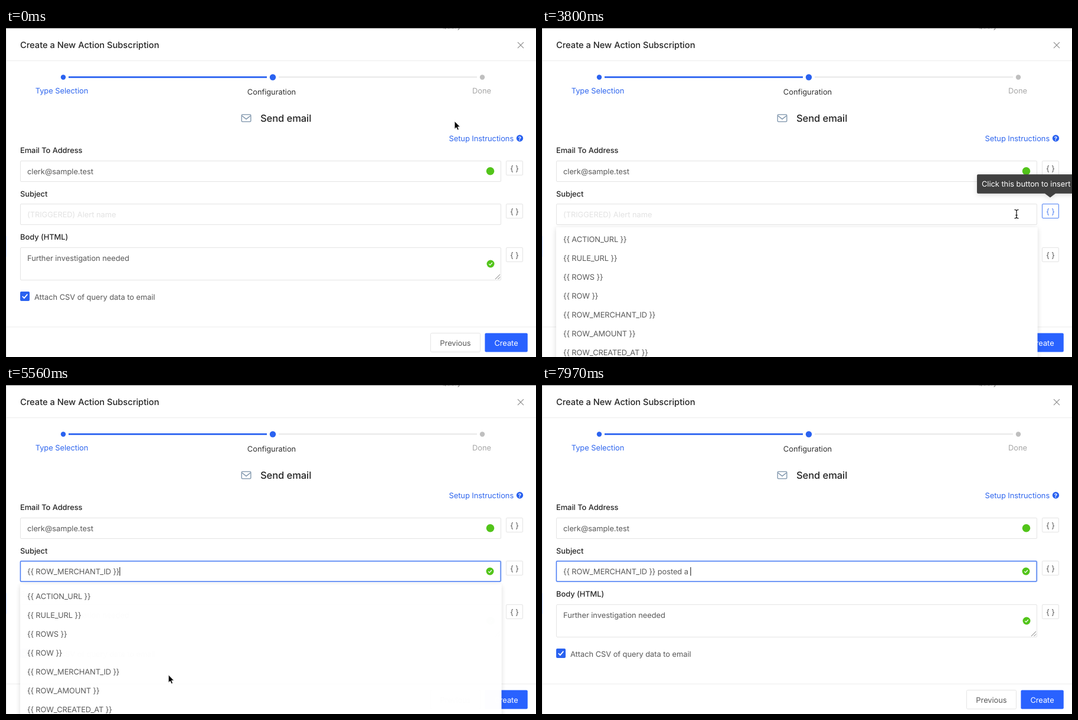
An HTML page that plays this animation: 898 by 558 pixels, repeating every 8000 ms.

```html
<!DOCTYPE html>
<html lang="en">
<head>
<meta charset="utf-8">
<title>Action subscription</title>
<style>
  html, body { margin: 0; width: 100%; height: 100%; overflow: hidden; background: #fff; }
  svg { display: block; width: 100%; height: 100%; }
  text {
    font: 400 12.9px Inter, "Open Sans", sans-serif;
    letter-spacing: -.05px; fill: #595959; white-space: pre;
    text-rendering: geometricPrecision;
  }
  .label { font-weight: 500; fill: #262626; }
  .title { font-size: 14.7px; letter-spacing: -.03px; }
  .head { font-size: 16.6px; letter-spacing: -.12px; }
  .code { letter-spacing: -.1px; }
  .blue { fill: #2f66ee; }
  .mid { text-anchor: middle; }
  .box { fill: #fff; stroke: #e4e4e4; }
</style>
</head>
<body>
<svg id="stage" viewBox="0 0 898 558" xmlns="http://www.w3.org/2000/svg">
  <defs>
    <filter id="shadow" x="-10%" y="-30%" width="120%" height="160%">
      <feDropShadow dx="0" dy="2" stdDeviation="4" flood-opacity=".15"/>
    </filter>
    <g id="ok">
      <circle r="6.5" fill="#52c41a"/>
      <path d="M-2.8 .1 -.8 2.1 2.9 -2" fill="none" stroke="#fff" stroke-width="1.3"/>
    </g>
  </defs>

  <rect width="898" height="558" fill="#fff"/>
  <path d="M0 .5H898" stroke="#8c8c8c"/>
  <path d="M.5 1V558" stroke="#e6e6e6"/>
  <path d="M.5 353V388" stroke="#c9d8fb"/>
  <text x="738" y="1.2" style="font-size:11.5px;fill:#666">Query</text>

  <text class="label title" x="24" y="33.5">Create a New Action Subscription</text>
  <path d="M867 24.2 877 34.2M877 24.2 867 34.2" stroke="#8c8c8c" stroke-width="1.2"/>
  <path d="M1 55.5H898M1 507H898" stroke="#ececec"/>

  <path d="M106 83.3H442" stroke="#2a62f0" stroke-width="2.8"/>
  <path d="M462 83.3H798" stroke="#ebebeb" stroke-width="2.6"/>
  <circle cx="97" cy="83.5" r="4.2" fill="#2a62f0"/>
  <circle cx="452" cy="83.5" r="5.2" fill="#2a62f0"/>
  <circle cx="807" cy="83.5" r="4.2" fill="#bfbfbf"/>
  <text class="mid blue" x="94.5" y="111">Type Selection</text>
  <text class="mid" x="450" y="113" style="fill:#333">Configuration</text>
  <text class="mid" x="806" y="111" style="fill:#a6a6a6">Done</text>

  <g fill="none" stroke="#7890a8" stroke-width="1.3">
    <rect x="399.2" y="146.8" width="15.6" height="12" rx="1.4"/>
    <path d="M400 149 407 154.6 414 149"/>
  </g>
  <text class="label head" x="431" y="158.5">Send email</text>

  <text class="blue" x="750.5" y="191.5">Setup Instructions</text>
  <circle cx="870.5" cy="187" r="5.7" fill="#2a62f0"/>
  <text class="mid" x="870.5" y="190.5" style="font-size:9.5px;font-weight:700;fill:#fff">?</text>

  <text class="label" x="24" y="212">Email To Address</text>
  <rect class="box" x="24.5" y="225.5" width="814" height="35" rx="1.5"/>
  <text x="36" y="247.5">clerk@sample.test</text>
  <circle cx="820.5" cy="242.8" r="6.8" fill="#52c41a"/>

  <text class="label" x="24" y="285.5">Subject</text>
  <rect id="glow" x="23" y="297.5" width="817" height="37" rx="3" fill="#d5e2ff"/>
  <rect class="box" x="24.5" y="298.5" width="814" height="35" rx="1.5"/>
  <rect id="focus" x="24.5" y="298.8" width="813.5" height="34.4" rx="1.5" fill="none" stroke="#4a7df3" stroke-width="1.4"/>
  <text id="hint" x="36" y="321" style="fill:#e2e2e2">(TRIGGERED) Alert name</text>
  <text id="subject" class="code" x="36" y="321"></text>
  <rect id="caret" y="309" width="1.1" height="14.5" fill="#222"/>
  <use id="valid" href="#ok" x="820" y="316"/>

  <text class="label" x="24" y="358.5">Body (HTML)</text>
  <rect class="box" x="24.5" y="372.5" width="814" height="55" rx="1.5"/>
  <text x="36" y="394.5">Further investigation needed</text>
  <use href="#ok" x="821" y="400"/>
  <path d="M829 426 837 418M833.5 426 837 422.5" stroke="#777"/>

  <rect x="24" y="447" width="16" height="16" rx="2" fill="#2a62f0"/>
  <path d="M27.8 455 30.8 458.2 36.3 451.6" fill="none" stroke="#fff" stroke-width="1.8"/>
  <text x="48" y="460.5">Attach CSV of query data to email</text>

  <rect class="box" x="719.5" y="517.5" width="84" height="32" rx="2"/>
  <text class="mid" x="761.5" y="538.5">Previous</text>
  <rect x="811.4" y="517.4" width="72.4" height="32.2" rx="2" fill="#2962ff"/>
  <text class="mid" x="847.5" y="538.5" style="fill:#fff">Create</text>

  <g id="braces"></g>

  <g id="menu">
    <rect x="24" y="338" width="815.5" height="250" rx="2" fill="#fff" filter="url(#shadow)"/>
    <rect id="hover" x="24" width="815.5" height="32" fill="#e4f6ff"/>
  </g>

  <g id="tip">
    <path d="M739 248.3H920V280.8H870L861 287.6 852 280.8H739Q737 280.8 737 278.8V250.3Q737 248.3 739 248.3Z" fill="#404040" filter="url(#shadow)"/>
    <text x="745" y="269.2" style="fill:#fff">Click this button to insert</text>
  </g>

  <g id="cursor">
    <path id="arrow" d="M0 0V13.4L3 10.7 5.1 15.2 7.4 14.2 5.4 9.8H9.5Z" fill="#000" stroke="#fff" stroke-width=".9"/>
    <path id="beam" d="M-3.5 -7.3Q0 -7.3 0 -5V5Q0 7.3 -3.5 7.3M3.5 -7.3Q0 -7.3 0 -5V5Q0 7.3 3.5 7.3M-1.6 2H1.6" fill="none" stroke="#222" stroke-width="1.3"/>
    <g id="hand" stroke="#111" stroke-width="1.1" stroke-linejoin="round" stroke-linecap="round">
      <path d="M-1.4 9.2V1.6Q-1.4 .3 -.1 .3 1.2 .3 1.2 1.6V5.6Q3.4 4.6 4 6 6.2 5.2 6.7 6.8 9.6 6.2 9.6 8.6 9.6 12.2 7.8 14V16H.6V14.4Q-1.4 12.6 -4 8.8 -4.6 7.4 -3.4 7.2 -2.4 7.2 -1.4 9.2Z" fill="#fff"/>
      <path d="M1.2 5.6V8.2M4 6V8.4M6.7 6.8V8.6M2.2 11V13.6M4.2 11V13.6M6.2 11V13.6" fill="none" stroke-width=".9"/>
    </g>
  </g>
</svg>

<script>
const LOOP = 8000;
const MENU_TOP = 338, ROW_TOP = 342, ROW_H = 32;
const PICK = 5410;
const CHOICE = '{{ ROW_MERCHANT_ID }}';
const ITEMS = ['ACTION_URL', 'RULE_URL', 'ROWS', 'ROW', 'ROW_MERCHANT_ID', 'ROW_AMOUNT', 'ROW_CREATED_AT'];
const TYPED = ' posted a ';
const KEYS = [6450, 7020, 7180, 7260, 7330, 7580, 7660, 7730, 7880, 7970];
// Cursor stops: time, x, y
const STOPS = [[70, 760, 158], [500, 858, 314.5], [3600, 858, 314.5], [3800, 804, 315.5], [4680, 275.2, 491.5]];

const $ = id => document.getElementById(id);
const clamp = v => Math.max(0, Math.min(1, v));
const ramp = (t, from, to) => clamp((t - from) / (to - from));
const ease = p => (1 - Math.cos(Math.PI * p)) / 2;
const mix = (a, b, p) => a + (b - a) * p;
const show = (id, on) => $(id).setAttribute('opacity', +on);

function add(parent, tag, attrs, text = '') {
  const el = document.createElementNS('http://www.w3.org/2000/svg', tag);
  for (const k in attrs) el.setAttribute(k, attrs[k]);
  el.textContent = text;
  parent.appendChild(el);
  return el;
}

const buttons = [226, 299, 373].map(y => ({
  box: add($('braces'), 'rect', { class: 'box', x: 847.5, y: y - .5, width: 28, height: 24, rx: 1.5 }),
  text: add($('braces'), 'text', { class: 'mid', x: 861.5, y: y + 16.6 }, '{ }')
}));
ITEMS.forEach((name, i) =>
  add($('menu'), 'text', { class: 'code', x: 36, y: ROW_TOP + 21 + i * ROW_H }, `{{ ${name} }}`));

function cursorAt(t) {
  let [, x, y] = STOPS[0];
  for (let i = 1; i < STOPS.length; i++) {
    const [t0, x0, y0] = STOPS[i - 1], [t1, x1, y1] = STOPS[i];
    if (t < t0) break;
    const p = ease(ramp(t, t0, t1));
    x = mix(x0, x1, p);
    y = mix(y0, y1, p);
  }
  return [x, y];
}

function cursorKind(t, x, y) {
  if (t >= PICK) return 'arrow';
  if (t > 3090 && y > MENU_TOP) return 'hand';
  if (x > 847 && y > 299 && y < 323) return 'hand';
  const inField = x < 838 && (y > 226 && y < 260 || y > 299 && y < 333);
  return inField ? 'beam' : 'arrow';
}

function drawMenu(t, kind, y) {
  const open = 1 - (1 - ramp(t, 3090, 3290)) ** 4;
  const amount = t < 5000 ? open : 1 - ramp(t, 5500, 5700) ** 4;
  show('menu', amount);
  $('menu').setAttribute('transform',
    `translate(0 ${MENU_TOP}) scale(1 ${mix(.8, 1, amount)}) translate(0 ${-MENU_TOP})`);
  const row = Math.floor((y - ROW_TOP) / ROW_H);
  show('hover', kind === 'hand' && row >= 0);
  $('hover').setAttribute('y', ROW_TOP + Math.max(0, row) * ROW_H);
}

function drawSubject(t) {
  const picked = t >= PICK;
  const count = KEYS.filter(k => t >= k).length;
  const field = $('subject');
  field.textContent = picked ? CHOICE + TYPED.slice(0, count) : '';
  $('caret').setAttribute('x', 36 + (picked ? field.getComputedTextLength() : 0));
  const blink = t >= 5980 && t < 6450 || t >= 6940 && t < 7020;
  show('caret', picked && !blink);
  show('hint', !picked);
  show('valid', picked);
  const focus = ramp(t, PICK, 5510);
  show('focus', focus);
  show('glow', focus);
}

function drawButton(t) {
  const on = ramp(t, 460, 640) - ramp(t, PICK, 5530);
  const tint = (a, b) => `rgb(${a.map((v, i) => Math.round(mix(v, b[i], on)))})`;
  buttons[1].box.style.stroke = tint([228, 228, 228], [74, 125, 243]);
  buttons[1].text.style.fill = tint([89, 89, 89], [74, 125, 243]);
}

function draw(t) {
  const [x, y] = cursorAt(t);
  const kind = cursorKind(t, x, y);
  for (const id of ['arrow', 'beam', 'hand']) show(id, id === kind);
  show('cursor', t < 6200);
  $('cursor').setAttribute('transform', `translate(${x} ${y})`);

  const tip = ramp(t, 540, 660) - ramp(t, 3940, 4060);
  show('tip', tip);
  $('tip').setAttribute('transform',
    `translate(861 288) scale(${mix(.85, 1, tip)}) translate(-861 -288)`);

  drawButton(t);
  drawSubject(t);
  drawMenu(t, kind, y);
}

let start;
function tick(now) {
  start ??= now;
  draw((now - start) % LOOP);
  requestAnimationFrame(tick);
}
draw(0);
requestAnimationFrame(tick);
</script>
</body>
</html>
```
